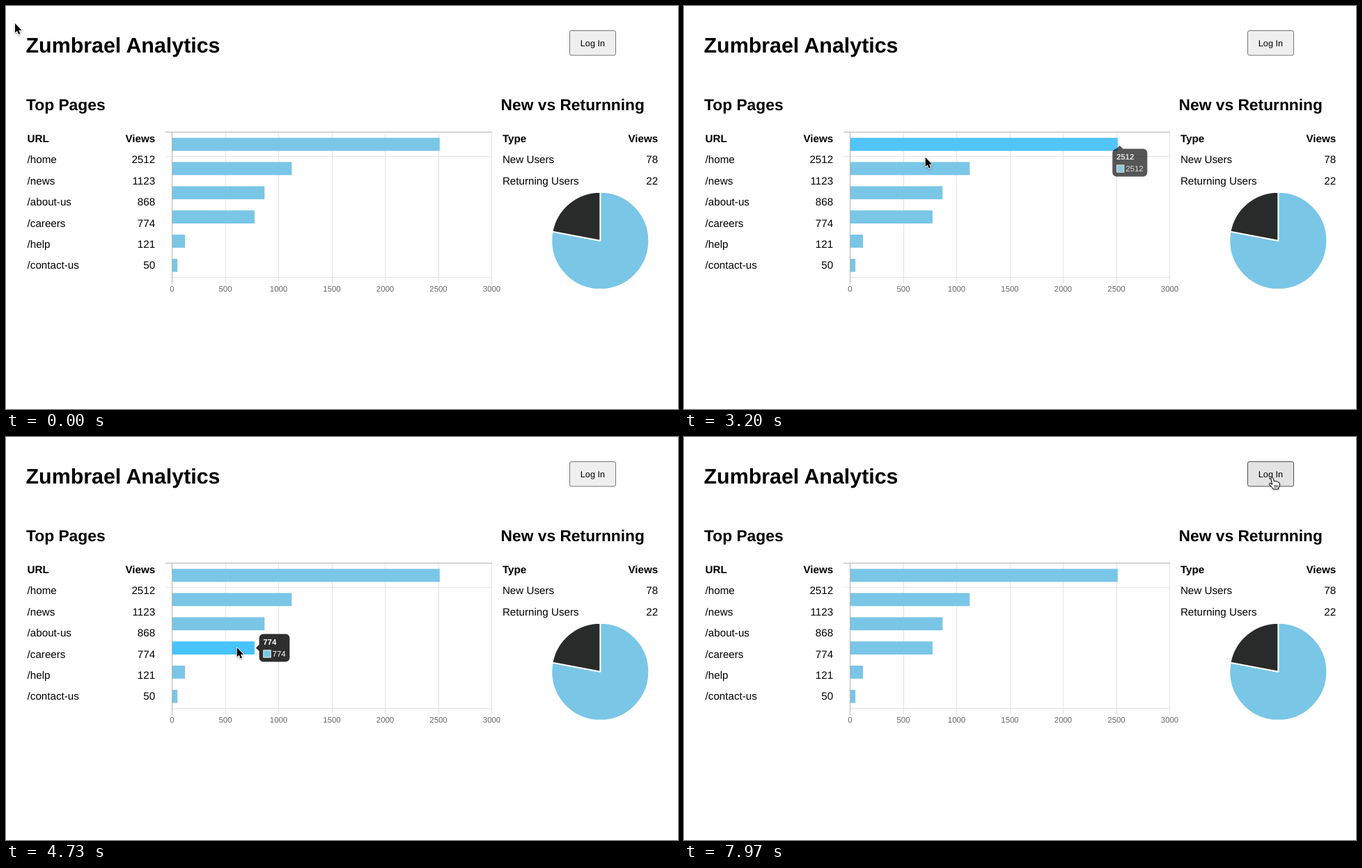
Animation, 965 px wide and 580 px high, one loop 8 s. Source, as an HTML page with a canvas:

```html
<!DOCTYPE html>
<html lang="en">
<head>
<meta charset="utf-8">
<title>Analytics dashboard</title>
<style>
  html, body { margin: 0; width: 100%; height: 100%; overflow: hidden; background: #fff; }
  canvas { display: block; }
</style>
</head>
<body>
<canvas id="stage" width="965" height="580"></canvas>
<script>
const ctx = document.getElementById('stage').getContext('2d');
const LOOP = 8000;
const BLUE = [122, 198, 231], HOT = [71, 196, 255], DARK = '#292b2a';
const FAMILY = '"Liberation Sans", Arial, sans-serif';

const pages = [
  ['/home', 2512], ['/news', 1123], ['/about-us', 868],
  ['/careers', 774], ['/help', 121], ['/contact-us', 50]
];

// Chart geometry
const X0 = 238.5, X1 = 697.5, Y0 = 181.5, Y1 = 390.5;
const ROW = (Y1 - Y0) / pages.length, BAR_H = 18.8;
const barEnd = i => X0 + (X1 - X0) * pages[i][1] / 3000;
const barMid = i => Y0 + ROW * (i + 0.5);

// Pointer stops: time, x, y
const stops = [
  [0, 13, 25], [230, 13, 25], [500, 70, 46], [770, 123, 64], [1230, 123, 64],
  [1500, 123, 59], [2070, 123, 59], [2400, 200, 110], [2700, 325, 188],
  [2830, 345, 200], [3100, 346, 207], [3280, 347, 226], [3630, 347, 238],
  [3760, 345, 246], [3890, 338, 262], [4270, 324, 289], [4440, 327, 303],
  [4850, 335, 303], [4925, 350, 297], [5050, 465, 243], [5115, 570, 193],
  [5200, 707, 126], [5330, 800, 84], [5500, 834, 67], [5800, 844.5, 58],
  [LOOP, 844.5, 58]
];

// Hover changes: time, bar index (-1 for none)
const hovers = [
  [2766, 0], [3180, -1], [3280, 1], [3760, -1], [3850, 2], [4270, -1],
  [4320, 3], [4925, -1], [5120, 0], [5136, -1]
];

const ease = ms => 1 - Math.pow(1 - Math.min(1, Math.max(0, ms / 400)), 4);
const lerp = (a, b, p) => a + (b - a) * p;
const rgb = c => `rgb(${c.map(Math.round)})`;

// Monotone cubic through the stops
function pointer(t) {
  let i = 0;
  while (i < stops.length - 2 && stops[i + 1][0] <= t) i++;
  const a = stops[i], b = stops[i + 1], h = b[0] - a[0], u = (t - a[0]) / h;
  const secant = (j, k) => j < 0 || j > stops.length - 2 ? 0 :
    (stops[j + 1][k] - stops[j][k]) / (stops[j + 1][0] - stops[j][0]);
  const slope = (j, k) => {
    const p = secant(j - 1, k), q = secant(j, k);
    return p * q <= 0 ? 0 : 2 * p * q / (p + q);
  };
  return [1, 2].map(k => {
    const v = u * u * (3 - 2 * u);
    return lerp(a[k], b[k], v) +
      h * (u * (1 - u) * (1 - u) * slope(i, k) - u * u * (1 - u) * slope(i + 1, k));
  });
}

function tipTarget(i) {
  const w = 24.7 + String(pages[i][1]).length * 6.34;
  return i === 0
    ? { x: barEnd(i) - 7.6, y: barMid(i) + 6.65, w, o: 1 }
    : { x: barEnd(i) + 6.65, y: barMid(i) - 19.9, w, o: 1 };
}

function mix(a, b, p) {
  const out = {};
  for (const k in a) out[k] = lerp(a[k], b[k], p);
  return out;
}

// Tooltip and bar highlights; each hover change restarts the easing
function hoverState(t) {
  let from = { ...tipTarget(4), o: 0 }, to = from, t0 = -1000, shown = 4;
  const start = pages.map(() => 0), goal = start.slice();
  for (const [time, bar] of hovers) {
    if (time > t) break;
    const p = ease(time - t0);
    from = mix(from, to, p);
    to = bar < 0 ? { ...to, o: 0 } : tipTarget(bar);
    if (bar >= 0) shown = bar;
    goal.forEach((g, i) => {
      if (p === 1) start[i] = g;
      goal[i] = i === bar ? 1 : 0;
    });
    t0 = time;
  }
  const p = ease(t - t0);
  return { tip: mix(from, to, p), shown, heat: start.map((s, i) => lerp(s, goal[i], p)) };
}

function text(str, x, y, size, { bold = false, align = 'left', color = '#000' } = {}) {
  ctx.font = `${bold ? 'bold ' : ''}${size}px ${FAMILY}`;
  ctx.textAlign = align;
  ctx.fillStyle = color;
  ctx.fillText(str, x, y);
}

function line(x1, y1, x2, y2, color) {
  ctx.strokeStyle = color;
  ctx.lineWidth = 1;
  ctx.beginPath();
  ctx.moveTo(x1, y1);
  ctx.lineTo(x2, y2);
  ctx.stroke();
}

function table(rows, left, right) {
  rows.forEach(([name, value], i) => {
    const y = 196 + i * 30.4, bold = i === 0;
    text(name, left, y, 15.2, { bold });
    text(value, right, y, 15.2, { bold, align: 'right' });
  });
}

function button(hover) {
  ctx.beginPath();
  ctx.roundRect(809.5, 35.5, 66, 35.5, 2.5);
  ctx.fillStyle = hover ? '#e3e3e3' : '#efefef';
  ctx.fill();
  ctx.strokeStyle = hover ? '#4f4f4f' : '#767676';
  ctx.lineWidth = 1;
  ctx.stroke();
  text('Log In', 842.4, 57.6, 12.67, { align: 'center' });
}

function chart(heat) {
  const light = '#e3e3e3', axis = '#b3b3b3';
  for (let v = 500; v <= 3000; v += 500) {
    const x = Math.floor(lerp(X0, X1, v / 3000)) + 0.5;
    line(x, Y0, x, 400, light);
  }
  line(229, 216.5, X1, 216.5, light);
  line(X0, Y1, X1, Y1, light);
  line(229, Y0, X1 + 0.5, Y0, axis);
  line(X0, Y0, X0, 400, axis);
  pages.forEach((_, i) => {
    ctx.fillStyle = rgb(BLUE.map((c, k) => lerp(c, HOT[k], heat[i])));
    ctx.fillRect(X0 + 0.5, barMid(i) - BAR_H / 2 + 0.2, barEnd(i) - X0 - 0.5, BAR_H);
  });
  for (let v = 0; v <= 3000; v += 500)
    text(v, lerp(X0, X1, v / 3000), 410.5, 11.4, { align: 'center', color: '#666' });
}

function pie() {
  const top = -Math.PI / 2, cut = top + Math.PI * 2 * 0.78;
  const slices = [[top, cut, rgb(BLUE)], [cut, top + Math.PI * 2, DARK]];
  for (const [a, b, color] of slices) {
    ctx.beginPath();
    ctx.moveTo(853.3, 337.8);
    ctx.arc(853.3, 337.8, 70, a, b);
    ctx.closePath();
    ctx.fillStyle = color;
    ctx.fill();
    ctx.strokeStyle = '#fff';
    ctx.lineWidth = 1.9;
    ctx.lineJoin = 'bevel';
    ctx.stroke();
  }
}

function tooltip({ x, y, w, o }, i) {
  if (o < 0.001) return;
  const h = 39.9, white = `rgba(255,255,255,${o})`, value = pages[i][1];
  ctx.fillStyle = `rgba(0,0,0,${0.82 * o})`;
  ctx.beginPath();
  ctx.roundRect(x, y, w, h, 5.7);
  if (i === 0) {
    ctx.moveTo(x + 5.7, y);
    ctx.lineTo(x + 10.45, y - 4.75);
    ctx.lineTo(x + 15.2, y);
  } else {
    ctx.moveTo(x, y + h / 2 + 4.75);
    ctx.lineTo(x - 4.75, y + h / 2);
    ctx.lineTo(x, y + h / 2 - 4.75);
  }
  ctx.closePath();
  ctx.fill();
  text(value, x + 5.7, y + 15.2, 11.4, { bold: true, color: white });
  ctx.fillStyle = white;
  ctx.fillRect(x + 5.7, y + 22.8, 11.4, 11.4);
  ctx.fillStyle = `rgba(${BLUE},${o})`;
  ctx.fillRect(x + 6.65, y + 23.75, 9.5, 9.5);
  text(value, x + 19, y + 32.4, 11.4, { color: white });
}

const arrow = new Path2D('M0 0V13.6L3.1 10.8L5.1 15.7L7.3 14.8L5.3 9.9H9.4Z');
const hand = new Path2D('M-1.8 1.4Q-.2-1 1.2 .9L3 6Q4.6 4.4 6 6.2Q7.6 5.2 8.6 7.2' +
  'Q10.2 6.6 10.9 9Q11.4 12 9.4 15L9 17H1.6L0 14.5L-4 10.6Q-4.6 8.2-2.2 8.6L.3 10.4Z');
const creases = new Path2D('M3.6 11V15M5.6 11V15M7.6 11V15');

function cursor([x, y], over) {
  ctx.save();
  ctx.translate(x, y);
  ctx.lineJoin = 'round';
  ctx.shadowColor = 'rgba(0,0,0,.35)';
  ctx.shadowBlur = 3;
  ctx.shadowOffsetY = 1;
  if (over) {
    ctx.fillStyle = '#fff';
    ctx.fill(hand);
    ctx.shadowColor = 'transparent';
    ctx.strokeStyle = '#000';
    ctx.lineWidth = 1;
    ctx.stroke(hand);
    ctx.lineWidth = 0.8;
    ctx.stroke(creases);
  } else {
    ctx.strokeStyle = '#fff';
    ctx.lineWidth = 1.8;
    ctx.stroke(arrow);
    ctx.shadowColor = 'transparent';
    ctx.fillStyle = '#000';
    ctx.fill(arrow);
  }
  ctx.restore();
}

function draw(t) {
  const pos = pointer(t), state = hoverState(t);
  const over = pos[0] > 809 && pos[0] < 876 && pos[1] > 35 && pos[1] < 71;
  ctx.fillStyle = '#fff';
  ctx.fillRect(0, 0, 965, 580);
  text('Zumbrael', 28.5, 67, 30.4, { bold: true });
  text('Analytics', 172.4, 67, 30.4, { bold: true });
  text('Top Pages', 29, 150, 22.8, { bold: true });
  text('New vs Returnning', 710.5, 150, 22.8, { bold: true });
  button(over);
  table([['URL', 'Views'], ...pages], 30.6, 214.2);
  table([['Type', 'Views'], ['New Users', 78], ['Returning Users', 22]], 712.9, 936.2);
  chart(state.heat);
  pie();
  tooltip(state.tip, state.shown);
  cursor(pos, over);
}

ctx.textRendering = 'geometricPrecision';
const began = performance.now();
function tick() {
  draw((performance.now() - began) % LOOP);
  requestAnimationFrame(tick);
}
tick();
</script>
</body>
</html>
```
